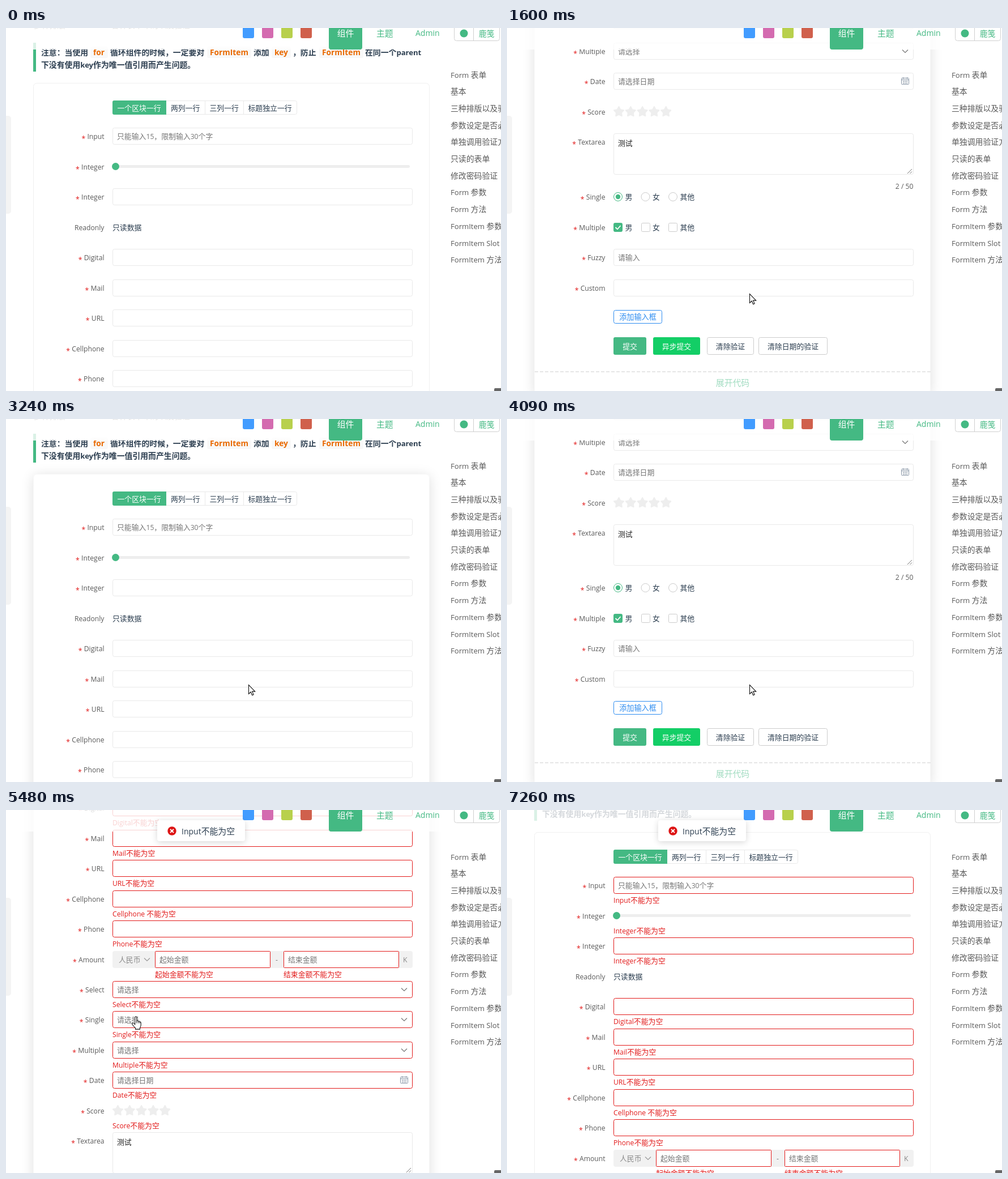
Recreate the animation shown at these times as an HTML page with a canvas. Size 874 px wide and 641 px high, loop 7.74 s.

```html
<!DOCTYPE html>
<html lang="zh-CN">
<head>
<meta charset="utf-8">
<title>Form</title>
<style>
html, body { margin: 0; width: 100%; height: 100%; overflow: hidden; background: #fff; }
canvas { display: block; width: 874px; height: 641px; }
</style>
</head>
<body>
<canvas id="stage" width="874" height="641"></canvas>
<script>
const ctx = document.getElementById('stage').getContext('2d');
const LOOP = 7740, TICK = 77, SUBMIT = 5140;
const GREEN = '#44b983', RED = '#e21a1a', INK = '#2c3e50', GRAY = '#5a5a5a', HINT = '#757575', LINE = '#e9e9e9';
const SMALL = 12.87, MID = 13.86, BIG = 14.85;

const rows = [
  ['Input', 'input', '只能输入15，限制输入30个字'], ['Integer', 'slider'], ['Integer', 'input'],
  ['Readonly', 'plain'], ['Digital', 'input'], ['Mail', 'input'], ['URL', 'input'],
  ['Cellphone', 'input'], ['Phone', 'input'], ['Amount', 'amount'],
  ['Select', 'select', '请选择'], ['Single', 'select', '请选择'], ['Multiple', 'select', '请选择'],
  ['Date', 'date', '请选择日期'], ['Score', 'score'], ['Textarea', 'area'],
  ['Single', 'radio'], ['Multiple', 'check'], ['Fuzzy', 'input', '请输入'], ['Custom', 'input']
];
const anchors = ['Form 表单', '基本', '三种排版以及验证', '参数设定是否必填', '单独调用验证方法', '只读的表单',
  '修改密码验证', 'Form 参数', 'Form 方法', 'FormItem 参数', 'FormItem Slot', 'FormItem 方法'];
// [time, scroll offset]
const wheel = [[0, 0], [980, 99], [1060, 198], [1140, 297], [1220, 396], [1300, 495], [1530, 693], [1600, 792],
  [2530, 693], [2610, 495], [2760, 198], [3240, 0],
  [3710, 198], [3780, 396], [3860, 594], [4090, 792], [4165, 891], [4240, 990]];

const clamp = v => Math.max(0, Math.min(1, v));
const mix = (a, b, p) => a + (b - a) * p;
const ease = p => (1 - Math.cos(Math.PI * clamp(p))) / 2;
const stepped = (t, start, count, gap = TICK) => clamp((Math.floor((t - start) / gap) + 1) / count);
const rowTop = i => Math.round(176.4 + 53.46 * i + (i > 15 ? 43.5 : 0));

function text(str, x, y, size, color, { align = 'left', bold = false } = {}) {
  const weight = bold ? 'bold ' : '';
  const runs = str.match(/[\u2e80-\uffff]+|[^\u2e80-\uffff]+/g).map(s => {
    const font = /[\u2e80-\uffff]/.test(s)
      ? `${weight}${size}px "Noto Sans CJK SC", "Noto Sans CJK", sans-serif`
      : `${weight}${size * 0.945}px "Open Sans", "Noto Sans", sans-serif`;
    ctx.font = font;
    return { s, font, w: ctx.measureText(s).width };
  });
  const width = runs.reduce((sum, r) => sum + r.w, 0);
  x -= align === 'right' ? width : align === 'center' ? width / 2 : 0;
  const left = x;
  ctx.fillStyle = color;
  for (const r of runs) {
    ctx.font = r.font;
    ctx.fillText(r.s, x, y);
    x += r.w;
  }
  return left;
}

function box(x, y, w, h, r, fill, stroke) {
  ctx.beginPath();
  if (stroke) ctx.roundRect(x + .5, y + .5, w - 1, h - 1, r);
  else ctx.roundRect(x, y, w, h, r);
  if (fill) { ctx.fillStyle = fill; ctx.fill(); }
  if (stroke) { ctx.strokeStyle = stroke; ctx.lineWidth = 1; ctx.stroke(); }
}

function disc(x, y, r, fill, stroke) {
  ctx.beginPath();
  ctx.arc(x, y, r, 0, 7);
  if (fill) { ctx.fillStyle = fill; ctx.fill(); }
  if (stroke) { ctx.strokeStyle = stroke; ctx.lineWidth = 1; ctx.stroke(); }
}

function line(color, width, ...pts) {
  ctx.beginPath();
  for (let i = 0; i < pts.length; i += 2) ctx.lineTo(pts[i], pts[i + 1]);
  ctx.strokeStyle = color;
  ctx.lineWidth = width;
  ctx.stroke();
}

function shadowed(alpha, blur, dy, draw) {
  ctx.save();
  ctx.shadowColor = `rgba(0,0,0,${alpha})`;
  ctx.shadowBlur = blur;
  ctx.shadowOffsetY = dy;
  draw();
  ctx.restore();
}

function faded(alpha, draw) {
  if (alpha <= 0) return;
  ctx.save();
  ctx.globalAlpha = alpha;
  draw();
  ctx.restore();
}

const chevron = (x, y, color) => line(color, 1.2, x - 5, y - 2.5, x, y + 2.5, x + 5, y - 2.5);

function tickBox(x, y, on) {
  box(x, y, 16, 16, 2, on ? GREEN : '#fff', on ? GREEN : '#ccc');
  if (on) line('#fff', 1.8, x + 3.5, y + 8, x + 7, y + 11.3, x + 12.5, y + 5);
}

function star(x, y) {
  ctx.beginPath();
  for (let i = 0; i < 10; i++) {
    const a = i * Math.PI / 5 - Math.PI / 2, r = i % 2 ? 4.8 : 9;
    ctx.lineTo(x + r * Math.cos(a), y + r * Math.sin(a));
  }
  ctx.closePath();
  ctx.fillStyle = ctx.strokeStyle = '#eee';
  ctx.lineJoin = 'round';
  ctx.lineWidth = 2;
  ctx.fill();
  ctx.stroke();
  ctx.lineJoin = 'miter';
}

function calendar(x, y) {
  const c = '#8795a5';
  box(x, y + 1, 14, 12, 1, null, c);
  line(c, 1, x, y + 4.5, x + 14, y + 4.5);
  for (const dy of [7, 10]) for (const dx of [3, 6, 9]) {
    ctx.fillStyle = c;
    ctx.fillRect(x + dx, y + dy - .5, 2, 1.5);
  }
  line(c, 1, x + 3.5, y, x + 3.5, y + 3);
  line(c, 1, x + 10.5, y, x + 10.5, y + 3);
}

function label(str, y, required = true) {
  const left = text(str, 173.5, y + 20, SMALL, GRAY, { align: 'right' });
  if (required) text('*', left - 10, y + 24, SMALL, RED);
}

function options(y, draw) {
  ['男', '女', '其他'].forEach((s, i) => {
    const x = 188 + i * 48.5;
    draw(x, i === 0);
    text(s, x + 20.5, y + 20, SMALL, INK);
  });
}

function drawRow([name, kind, hint], y, failed, hovered) {
  const edge = failed ? RED : hovered ? '#cfcfcf' : LINE;
  label(name, y, kind !== 'plain');
  if (['input', 'select', 'date'].includes(kind)) {
    box(188, y, 530, 30, 3, '#fff', edge);
    if (hint) text(hint, 196, y + 20, SMALL, HINT);
  }
  if (kind === 'select') chevron(703, y + 15, '#777');
  if (kind === 'date') calendar(696, y + 8);
  if (kind === 'plain') text('只读数据', 188, y + 20, SMALL, INK);
  if (kind === 'slider') {
    box(193, y + 12, 520, 5, 2.5, '#eee');
    disc(193.5, y + 14.5, 6.5, GREEN);
  }
  if (kind === 'score') for (let i = 0; i < 5; i++) star(197.5 + i * 20.8, y + 15);
  if (kind === 'area') {
    box(188, y, 530, 73, 3, '#fff', LINE);
    text('测试', 196, y + 22, SMALL, '#222');
    line('#777', 1, 707, y + 71, 715, y + 63);
    line('#777', 1, 711.5, y + 71, 715, y + 67.5);
    text('2 / 50', 717.5, y + 98, SMALL, GRAY, { align: 'right' });
  }
  if (kind === 'radio') options(y, (x, on) => {
    disc(x + 8, y + 15, 7.5, '#fff', on ? GREEN : '#ccc');
    if (on) disc(x + 8, y + 15, 4.2, GREEN);
  });
  if (kind === 'check') options(y, (x, on) => tickBox(Math.round(x), y + 7, on));
  if (kind === 'amount') {
    box(188, y, 530, 30, 4, '#f1f1f1');
    text('人民币', 199, y + 20, SMALL, '#888');
    chevron(249, y + 15, '#999');
    text('-', 476, y + 20, SMALL, '#777');
    text('K', 701, y + 20, SMALL, '#888');
    [[263, 204, '起始金额'], [490, 204, '结束金额']].forEach(([x, w, s]) => {
      box(x, y, w, 30, 1, '#fff', edge);
      text(s, x + 8, y + 20, SMALL, HINT);
      if (failed) text(s + '不能为空', x, y + 46, SMALL, RED);
    });
  } else if (failed && !['plain', 'area', 'radio', 'check'].includes(kind)) {
    text(name + (name === 'Cellphone' ? ' ' : '') + '不能为空', 188, y + 46, SMALL, RED);
  }
}

function drawNotice() {
  text('多种排版', 49, 0, MID, HINT);
  text('各种表单布局以及验证', 186, 0, MID, HINT);
  ctx.fillStyle = GREEN;
  ctx.fillRect(48, 26, 5, 51);
  const bold = { bold: true };
  [['注意：当使用', 62], ['循环组件的时候，一定要对', 184], ['添加', 437], ['，防止', 506], ['在同一个parent', 634]]
    .forEach(([s, x]) => text(s, x, 48, MID, INK, bold));
  [['for', 154, 21], ['FormItem', 360, 68], ['key', 474, 24], ['FormItem', 558, 68]].forEach(([s, x, w]) => {
    box(x - 5, 33, w + 10, 20, 3, '#f8f8f8');
    text(s, x, 48, 14.55, '#e96900', bold);
  });
  text('下没有使用key作为唯一值引用而产生问题。', 62, 69.5, MID, INK, bold);
}

function drawTabs() {
  box(188, 128, 326, 25, 3, '#fff', LINE);
  box(188, 128, 95, 25, [3, 0, 0, 3], GREEN);
  line(LINE, 1, 351.5, 128, 351.5, 153);
  line(LINE, 1, 419.5, 128, 419.5, 153);
  [['一个区块一行', 196.5], ['两列一行', 291], ['三列一行', 359.5], ['标题独立一行', 427.5]]
    .forEach(([s, x], i) => text(s, x, 145.5, SMALL, i ? INK : '#fff'));
}

function drawButtons(hot) {
  box(188, 1290, 86, 24, 3, '#fff', '#2d8cf0');
  text('添加输入框', 231, 1307, 13.1, '#2d8cf0', { align: 'center' });
  [[188, 58, '提交', hot ? '#63c398' : GREEN], [258, 83, '异步提交', '#13ce66'],
   [353, 83, '清除验证'], [444, 122, '清除日期的验证']].forEach(([x, w, s, fill]) => {
    box(x, 1338, w, 31, 3, fill || '#fff', fill ? null : '#ccc');
    text(s, x + w / 2, 1358.5, SMALL, fill ? '#fff' : INK, { align: 'center' });
  });
}

function drawTooltip() {
  box(110, 1299, 213, 30, 4, '#4c4c4c');
  ctx.beginPath();
  ctx.moveTo(212, 1329);
  ctx.lineTo(222, 1329);
  ctx.lineTo(217, 1334);
  ctx.fill();
  text('执行异步验证但是不等待结果', 216.5, 1320, BIG, '#fff', { align: 'center' });
}

function drawPage(s) {
  ctx.save();
  ctx.translate(0, -s.scroll);
  drawNotice();
  if (s.hover > 0) shadowed(.13 * s.hover, 22, 3, () => box(48, 97, 700, 1340, 6, '#fff'));
  box(48, 97, 700, 1340, 6, '#fff', s.hover > .5 ? '#f7f7f7' : '#f0f0f0');
  drawTabs();
  rows.forEach((row, i) => {
    const y = rowTop(i), sy = y - s.scroll;
    if (sy < -150 || sy > 660) return;
    drawRow(row, y, s.failed, s.moving && s.y >= sy && s.y < sy + 30);
  });
  drawButtons(s.tip > 0);
  ctx.setLineDash([6, 3]);
  line('#e6e6e6', 2, 49, 1399, 748, 1399);
  ctx.setLineDash([]);
  text('展开代码', 398.5, 1424, BIG, '#a1dcc1', { align: 'center' });

  text('参数设定是否必填', 48.5, 1508.5, 19.8, INK);
  box(48, 1524, 700, 500, 6, '#fff', '#f0f0f0');
  tickBox(188, 1562, true);
  text('是否必填', 209, 1575.5, SMALL, INK);
  tickBox(273, 1562, true);
  text('是否使用Message提示错误信息', 293, 1575.5, SMALL, INK);
  label('自定义数组', 1608);
  box(188, 1608, 530, 30, 3, '#fff', LINE);
  faded(s.tip, drawTooltip);
  ctx.restore();
}

function drawChrome() {
  box(-6, 155, 15, 173, 5, '#f4f4f4');
  anchors.forEach((s, i) => text(s, 785, 87.5 + i * 29.7, MID, GRAY));
  ctx.fillStyle = 'rgba(255,255,255,.8)';
  ctx.fillRect(0, 0, 874, 38);
  ['#429cff', '#d46bb0', '#b8d04c', '#d0604c'].forEach((c, i) => box(418 + i * 34, -2, 20, 20, 3, c));
  box(570, -10, 59, 48, 4, GREEN);
  text('组件', 599.5, 14.5, BIG, '#fff', { align: 'center' });
  text('主题', 654, 14.5, BIG, GREEN);
  text('Admin', 723, 14, BIG, GREEN);
  box(791, -8, 81, 31, 4, '#fff', '#d0d0d0');
  line('#d0d0d0', 1, 825.5, 0, 825.5, 22);
  disc(808.5, 9.5, 7, GREEN);
  text('鹿笺', 848.5, 14.5, MID, GREEN, { align: 'center' });
  box(862, 636, 20, 20, 2, '#666');
}

function drawToast() {
  shadowed(.16, 12, 2, () => box(267, 18, 155, 37, 4, '#fff'));
  disc(293, 37, 7.7, '#dd1414');
  line('#fff', 1.8, 290, 34, 296, 40);
  line('#fff', 1.8, 296, 34, 290, 40);
  text('Input不能为空', 310, 42.5, BIG, INK);
}

const arrow = new Path2D('M0 0V16L3.7 12.5L6.2 18.3L8.6 17.2L6.2 11.6H11.2Z');
const hand = new Path2D('M-1.8 1.8Q-1.8 .3-.2 .3Q1.4 .3 1.4 1.8V7.8Q3.7 7 4.4 8.6Q6.3 8 6.8 9.6Q8.7 9.3 8.7 11.2V15Q8.7 18 7 20V22.6H-1V20.4Q-4 18-6.6 14Q-7.7 12.3-6.3 11.6Q-4.7 11.2-1.8 14Z');

function drawMouse(s) {
  if (!s.shown) return;
  ctx.save();
  ctx.translate(s.x + .5, s.y + .5);
  ctx.fillStyle = '#fff';
  ctx.strokeStyle = '#111';
  ctx.lineWidth = 1.1;
  const shape = s.hand ? hand : arrow;
  ctx.fill(shape);
  ctx.stroke(shape);
  if (s.hand) {
    line('#111', 1, 1.4, 7.8, 1.4, 12);
    line('#111', 1, 4.4, 8.6, 4.4, 12);
    line('#111', 1, 6.8, 9.8, 6.8, 12);
  }
  ctx.restore();
}

function stateAt(now) {
  const t = now >= 4090 && now < 5860 ? 4090 + Math.floor((now - 4090) / TICK) * TICK : now;
  let scroll = wheel.filter(([at]) => at <= now).pop()[1];
  if (t >= SUBMIT) scroll = Math.round(mix(990, 58, ease((t - SUBMIT) / 580)));

  let x, y;
  if (now < 4320) {
    const p = ease(stepped(now, 70, 7, 75));
    x = mix(600, 428, p);
    y = mix(600, 469, p);
  } else if (now < 6560) {
    const p = ease((t - 4320) / 540);
    x = mix(428, 229, p);
    y = mix(469, 364, p);
  } else {
    const p = stepped(now, 6560, 10, 77.7) - .1;
    x = mix(226, 781, p ** 1.4 * 1.12);
    y = mix(358, 636, p ** 1.7 * 1.12);
  }
  return {
    scroll, x: Math.round(x), y: Math.round(y),
    shown: now >= 70 && now < 7255,
    hand: t >= 4780 && now < 5780,
    moving: now >= 70 && now < 980,
    hover: clamp((now - 70) / 200) * clamp((7240 - now) / 150),
    tip: clamp((t - 4780) / 200) * clamp((SUBMIT + 100 - t) / 100),
    toast: clamp((t - SUBMIT) / 200),
    failed: t >= SUBMIT
  };
}

function frame(ms) {
  const s = stateAt(ms % LOOP);
  ctx.fillStyle = '#fff';
  ctx.fillRect(0, 0, 874, 641);
  drawPage(s);
  drawChrome();
  faded(s.toast, drawToast);
  drawMouse(s);
}

const start = performance.now();
function run() {
  frame(performance.now() - start);
  requestAnimationFrame(run);
}
run();
</script>
</body>
</html>
```
